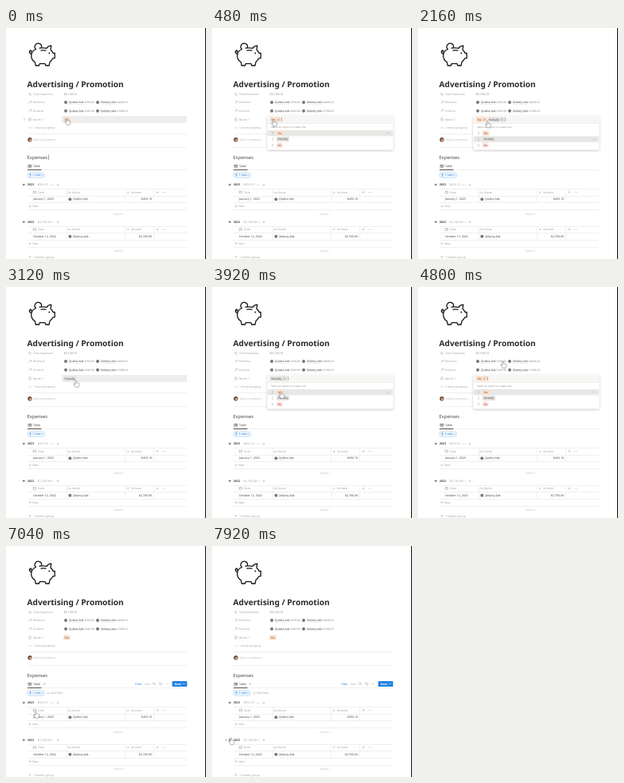
Write an HTML page that moves like this. It is 251 px wide and 289 px high and loops after 8 s.

```html
<!DOCTYPE html>
<html lang="en">
<head>
<meta charset="utf-8">
<title>Expense page</title>
<style>
  html, body { margin: 0; width: 100%; height: 100%; overflow: hidden; background: #fff; }
  svg { display: block; width: 100vw; height: 100vh; }
  text { font-family: "Noto Sans", "Open Sans", sans-serif; text-rendering: geometricPrecision; white-space: pre; }
</style>
</head>
<body>
<svg id="stage" viewBox="0 0 251 289"></svg>
<script>
const DURATION = 8000, STEP = 80;
const GREY = '#a5a4a1', DARK = '#454441', RULE = '#f0f0ee', BLUE = '#2383e2';
const TAGS = {
  Yes: { fill: '#fadec9', ink: '#8a5432', width: 8.5 },
  Partially: { fill: '#e3e2e0', ink: '#4b4a47', width: 16 },
  No: { fill: '#ffe2dd', ink: '#8a4a4a', width: 7.5 }
};

// y is the vertical centre of the text line
const text = (x, y, string, fill = GREY, size = 3.6, attrs = '') =>
  `<text x="${x}" y="${y + size * .36}" font-size="${size}" fill="${fill}" ${attrs}>${string}</text>`;
const rect = (x, y, w, h, fill, r = 0, attrs = '') =>
  `<rect x="${x}" y="${y}" width="${w}" height="${h}" rx="${r}" fill="${fill}" ${attrs}/>`;
const path = (d, stroke = GREY, width = .5, fill = 'none') =>
  `<path d="${d}" fill="${fill}" stroke="${stroke}" stroke-width="${width}" stroke-linecap="round" stroke-linejoin="round"/>`;
const dot = (x, y, r, fill) => `<circle cx="${x}" cy="${y}" r="${r}" fill="${fill}"/>`;
const rule = (x, y, w) => rect(x, y, w, 1, RULE);
const group = (id, content) => `<g id="${id}">${content}</g>`;

const plus = (x, y) => path(`M${x - 1.2} ${y}h2.4M${x} ${y - 1.2}v2.4`, GREY, .45);
const more = (x, y) => [-1.7, 0, 1.7].map(d => dot(x + d, y, .45, GREY)).join('');
const handle = (x, y) => [-1.4, 0, 1.4].map(d => dot(x - .7, y + d, .4, GREY) + dot(x + .7, y + d, .4, GREY)).join('');
const lens = (x, y) => path(`M${x + .7} ${y + .7}l1.1 1.1M${x + .9} ${y - .4}a1.3 1.3 0 1 1-2.6 0a1.3 1.3 0 1 1 2.6 0`);
const calendar = (x, y) => path(`M${x - 1.5} ${y - 1.3}h3v2.8h-3zM${x - 1.5} ${y - .4}h3`);
const gridIcon = (x, y) => path(`M${x - 1.7} ${y - 1.5}h3.4v3h-3.4zM${x - 1.7} ${y - .4}h3.4M${x} ${y - .4}v1.9`, DARK);

const tag = (name, x, y, removable) => {
  const { fill, ink, width } = TAGS[name];
  return rect(x, y - 3, width + (removable ? 5 : 0), 6, fill, .9) +
    text(x + 1.4, y, name, ink, 3.4) +
    (removable ? path(`M${x + width + 1} ${y - .9}l1.8 1.8m0-1.8l-1.8 1.8`, '#8a8783', .45) : '');
};

const pageLink = (x, y, name) =>
  dot(x + 2, y, 2, '#777') + text(x + 5.7, y, name, DARK, 3.6, 'font-weight="500"') +
  rect(x + 5.7, y + 1.9, 19, .3, '#cfcecb');

const piggy = () => path(
  'M37.5 26.5C33.7 28 31.7 31 31.7 35C31.7 38.5 33.5 41 36.4 42.8L37.2 47H41.5L42.2 44.6H49L49.8 47H54L55.1 42.3' +
  'C57 41 58.1 39.5 58.9 37.8H61.2V31.5H59.1C58.4 29.7 57.4 28.4 56 27.2L56.8 22.2C54.2 22.3 52.2 23.4 51 25.3' +
  'C48.5 24.7 44.5 24.8 42 25.2' +
  'M32 32.5C29.4 32.5 28.6 29.5 30.2 28.2C31.7 27.4 32.4 29.4 31 30' +
  'M44 28.2C46 27.7 48 27.7 50 28.2' +
  'M37.5 26.5A4.2 4.2 0 1 1 44.3 24.8', '#151515', 1.3) + dot(54.3, 31.5, .9, '#151515');

const label = (y, string) => text(34, y, string);

const properties = () =>
  lens(30, 83) + label(83, 'Total Expenses') + text(72.5, 83, '$3,150.10', '#858380') +
  [['Revenue', 93.1, '$700.00', '$4600.25'], ['Income', 103.7, '$249.90', '$1900.25']].map(([name, y, a, b]) =>
    path(`M28.6 ${y + 1.2}l3-2.6m-1.6 0h1.6v1.6`) + label(y, name) +
    pageLink(73, y, 'Quibra Ads') + text(98.8, y, a, '#858380', 3.3) +
    pageLink(113, y, 'Zelomy Ads') + text(139.3, y, b, '#858380', 3.3)).join('') +
  path('M28.5 112.9h3m-3 1.5h3m-3 1.5h3') + label(114.4, 'Worth ?') +
  path('M28.7 124.3l1.4 1.4 1.4-1.4') + label(125, '1 more property') +
  rule(27, 132, 200) +
  dot(30, 139.8, 2.7, '#6b4a3e') + dot(30.7, 140.2, 1.5, '#e0a78d') +
  text(35, 139.8, 'Add a comment…', '#b9b8b5') + rule(27, 149, 200);

const yearTable = (y, year, date, name, amount) =>
  path(`M21.2 ${y - .8}h2.4l-1.2 1.8z`, DARK, .3, DARK) +
  text(27, y, year, DARK, 3.6, 'font-weight="600"') + text(39.5, y, amount) + more(57.5, y) + plus(65, y) +
  rule(27, Math.round(y + 5), 200) +
  calendar(36, y + 9.3) + text(40, y + 9.3, 'Date') +
  text(77.5, y + 9.3, 'Aa Name') +
  text(152, y + 9.3, '#') + text(157, y + 9.3, 'Amount') + plus(190, y + 9.3) + more(198, y + 9.3) +
  rule(27, Math.round(y + 13.5), 200) +
  text(34, y + 18, date, DARK) + pageLink(78.3, y + 18, name) +
  text(183, y + 18, amount, DARK, 3.6, 'text-anchor="end"') +
  rule(27, Math.round(y + 22), 200) +
  [76, 149, 185].map(x => rect(x, Math.round(y + 5), 1, 17, RULE)).join('') +
  plus(30, y + 26.8) + text(33, y + 26.8, 'New') + rule(27, Math.round(y + 31), 200) +
  text(148, y + 36.5, 'COUNT 1', '#b5b4b1', 3, 'text-anchor="end"');

const expenses = () =>
  text(26.6, 162, 'Expenses', DARK, 5.8, 'font-weight="500"') +
  gridIcon(30, 172.7) + text(34, 172.7, 'Table', DARK, 3.6, 'font-weight="500"') +
  rule(27, 177, 200) + rect(27, 177, 17.5, 1, '#555451') +
  rect(26.7, 180.7, 22, 6.7, '#edf5fc', 3.3, 'stroke="#b4d7f3" stroke-width=".6"') +
  path('M30.5 185.8v-3.4m-1.1 1.1l1.1-1.1 1.1 1.1M44 183.6l1 1 1-1', BLUE) + text(33.5, 184.1, '1 rule', BLUE) +
  yearTable(196.2, '2023', 'January 1, 2023', 'Quibra Ads', '$450.10') +
  yearTable(242.7, '2022', 'October 12, 2022', 'Zelomy Ads', '$2,700.00') +
  plus(30, 286.3) + text(34, 286.3, '1 hidden group');

const tableControls = () =>
  plus(48, 172.6) + plus(53, 184.1) + text(56, 184.1, 'Add filter') +
  text(162, 172.5, 'Filter', BLUE) + text(174, 172.5, 'Sort') + lens(186, 172.3) +
  path('M192.6 173.8l3-3m-3 1.4v-1.4h1.4m.2 3h1.4v-1.4') + more(202, 172.5) +
  rect(208.5, 169, 18.8, 7, BLUE, 1) + text(211.5, 172.5, 'New', '#fff', 3.6, 'font-weight="600"') +
  path('M222.3 172l1 1 1-1', '#fff', .6) + rect(220, 169, .3, 7, '#6fb0ee');

const popup = () =>
  rect(69.5, 109.7, 157.8, 42.5, '#fff', 1.2, 'filter="url(#shadow)"') +
  rect(69.7, 109.9, 157.4, 9.6, '#f7f6f4', 1) + rule(69.7, 119, 157.4) +
  group('chosen', '') +
  text(74, 124.2, 'Select an option or create one', '#8f8e8b', 3.1) +
  group('optionHover', rect(69.9, 127.8, 157, 7.5, '#e9e8e6') + more(221, 131.5)) +
  Object.keys(TAGS).map((name, i) => handle(76, 131.5 + i * 7.5) + tag(name, 81, 131.5 + i * 7.5)).join('');

const hand = () => path(
  'M-1.2 .6V-3.4a.8.8 0 0 1 1.6 0V-.8a.7.7 0 0 1 1.3.1a.7.7 0 0 1 1.2.2a.7.7 0 0 1 1 .6V1.8C3.9 3 3 3.4 3 4.3H-1C-1 3.2-2.2 2.4-3 .8C-3.4 0-2.4-.7-1.2.6z',
  '#666', .5, '#fff');

const stage = document.getElementById('stage');
stage.innerHTML =
  `<defs><filter id="shadow" x="-10%" y="-30%" width="120%" height="160%">
    <feDropShadow dx="0" dy="1" stdDeviation="1.6" flood-color="#0f0f0f" flood-opacity=".28"/></filter></defs>` +
  rect(0, 0, 251, 289, '#fff') + rect(250, 0, 1, 289, '#111') +
  piggy() + text(26.6, 70, 'Advertising / Promotion', '#2b2a27', 10.1, 'font-weight="700"') +
  group('cellHover', rect(70, 110, 157, 9, '#efeeec', .8)) + group('value', '') +
  properties() + expenses() +
  group('caret', rect(53, 158.3, .5, 7, DARK)) +
  group('rowHandle', handle(23, 114.4)) +
  group('headingHandle', plus(17.5, 162) + handle(23, 162)) +
  group('yearHandle', plus(17.5, 242.7) + handle(22, 242.7)) +
  group('controls', tableControls()) + group('popup', popup()) + group('cursor', hand());

const part = Object.fromEntries([...stage.querySelectorAll('g[id]')].map(g => [g.id, g]));
const show = (id, amount) => part[id].setAttribute('opacity', +amount);
const ramp = (t, from, to) => Math.min(1, Math.max(0, (t - from) / (to - from)));
const between = (t, from, to) => t >= from && t < to;

// Pointer stops: time, x, y
const stops = [
  [0, 77, 117], [400, 77, 117], [880, 86, 139], [1520, 86, 139], [2080, 87, 120], [2240, 88, 121],
  [3360, 88, 121], [3840, 87, 135], [4080, 87, 135], [4400, 94, 117], [4560, 94, 117], [4800, 107, 97],
  [5600, 107, 97], [6160, 46, 191], [6640, 46, 191], [7600, 24, 244], [8000, 24, 244]
];
const pointer = t => {
  const i = stops.findIndex(stop => stop[0] > t);
  const [t0, x0, y0] = stops[i - 1], [t1, x1, y1] = stops[i];
  const k = ramp(t, t0, t1), ease = k * k * (3 - 2 * k);
  return [x0 + (x1 - x0) * ease, y0 + (y1 - y0) * ease];
};

const selection = t =>
  t < 1040 ? ['Yes'] : t < 2240 ? ['Yes', 'Partially'] : t < 4080 ? ['Partially'] :
  t < 4560 ? ['Partially', 'Yes'] : ['Yes'];

const popupOpacity = t =>
  t < 2000 ? ramp(t, 320, 480) : t < 3200 ? 1 - ramp(t, 2640, 2880) :
  t < 4400 ? ramp(t, 3360, 3520) : 1 - ramp(t, 5040, 5200);

function draw(t) {
  const [x, y] = pointer(t), names = selection(t);
  let next = 73;
  part.chosen.innerHTML = names.map(name => {
    const chip = tag(name, next, 114.6, true);
    next += TAGS[name].width + 6;
    return chip;
  }).join('') + rect(next, 112, .4, 5, DARK);
  part.value.innerHTML = tag(names[0], 72.2, 114.6);
  part.optionHover.setAttribute('transform', `translate(0 ${between(t, 720, 3000) ? 7.5 : 0})`);
  part.cursor.setAttribute('transform', `translate(${x} ${y})`);
  show('popup', popupOpacity(t));
  show('cellHover', x > 70 && between(y - 3, 109, 120));
  show('caret', t < 400);
  show('rowHandle', t < 400);
  show('headingHandle', between(t, 6000, 6480) ? .6 : 0);
  show('yearHandle', t >= 7520);
  show('controls', ramp(t, 6000, 6240));
}

function tick() {
  draw(Math.floor(performance.now() % DURATION / STEP) * STEP);
  requestAnimationFrame(tick);
}
tick();
</script>
</body>
</html>
```
